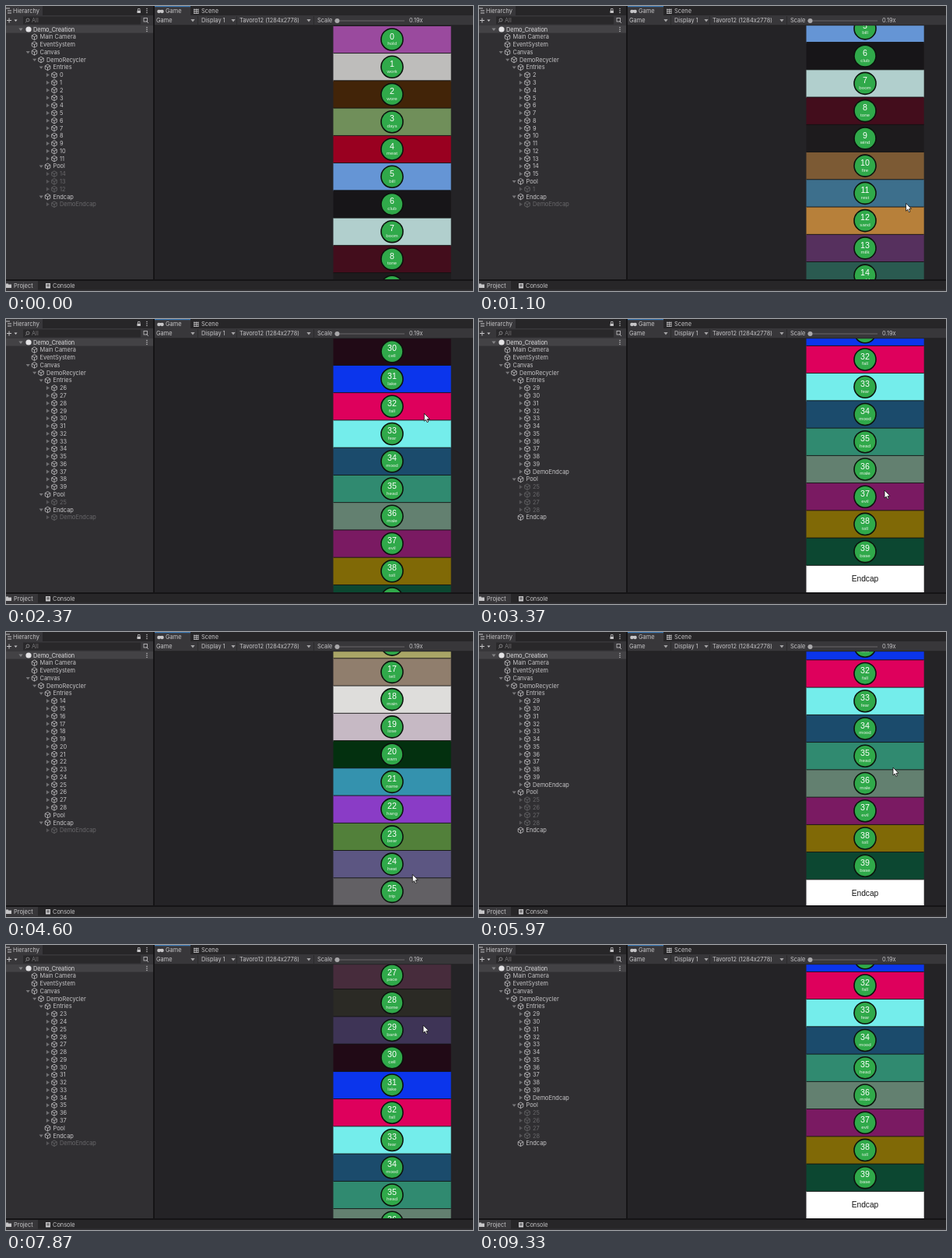
Animation, 600 px wide and 366 px high, one loop 9.36 s. Source, as an HTML page with a canvas:

```html
<!DOCTYPE html>
<html lang="en">
<head>
<meta charset="utf-8">
<title>Recycled list demo</title>
<style>
html, body { margin: 0; width: 600px; height: 366px; overflow: hidden; background: #242326; }
canvas { display: block; }
</style>
</head>
<body>
<canvas id="stage" width="600" height="366"></canvas>
<script>
const ctx = document.getElementById('stage').getContext('2d');
const LOOP = 9360, PITCH = 35.25, TOP = 25.3, VIEW = 326, COUNT = 40, POOL = 15;
const UI = 'Inter, "Open Sans", sans-serif', ENTRY = '"Liberation Sans", Arial, sans-serif';
const LIGHT = '#c6c5c7', DIM = '#68676a';

const words = ('hold work wore days meat bill club boom tone wind fire rest sand milk gold path ' +
  'camp tell main lose earn name hang bear heat trip calm pace home bank ' +
  'cell lake fall fear mood head male evil toll base').split(' ');
const colors = ('9a4a9e bebdbb 422408 708f5a 990020 6595d5 171518 b1cfcd 430d1c 1d1b1d ' +
  '7c5a34 3d6f8c b7803a 56305e 2a5a50 8c3d3d a9a566 907e6d dedddb c6b9c4 ' +
  '03300f 3492ae 8a3cc6 52803a 5c5682 626064 62653a 472c3c 2b2a25 3e3456 ' +
  '210a16 0b35ec de005c 74edeb 1b4b6c 308a70 638070 7a1a62 806906 0c4731').split(' ');

// [time, scroll offset]
const scrollKeys = [
  [0, 0], [550, 0], [850, 90], [1100, 190], [1400, 260], [1600, 454], [1700, 584.5],
  [1850, 752], [2000, 878], [2300, 1036], [2600, 1108], [2800, 1119], [3830, 1119],
  [4100, 960], [4450, 640], [4750, 570], [5050, 680], [5350, 980], [5650, 1117.5],
  [5970, 1117.5], [6200, 1010], [6500, 740], [6700, 665], [6870, 647.3], [7250, 630],
  [7600, 705], [7800, 912], [7870, 955.3], [8050, 1015], [8500, 1080], [8900, 1119], [LOOP, 1119]];
// [time, x, y]
const mouseKeys = [
  [0, 620, 240], [120, 620, 240], [500, 552, 290], [900, 550, 180], [1250, 548, 300],
  [1700, 550, 37], [2100, 545, 70], [2800, 525, 200], [3370, 521, 220], [3800, 525, 120],
  [4450, 524, 300], [4800, 520, 318], [5350, 535, 110], [5970, 532, 174], [6150, 531, 165],
  [6870, 514, 327], [7400, 516, 325], [7870, 536, 103], [8250, 535, 250], [8800, 534, 110],
  [9050, 540, 200], [9300, 556, 380], [LOOP, 556, 380]];

// Monotone cubic interpolation of one column
function sample(keys, t, col = 1) {
  let i = 0;
  while (i < keys.length - 2 && t >= keys[i + 1][0]) i++;
  const slope = k => keys[k] && keys[k + 1]
    ? (keys[k + 1][col] - keys[k][col]) / (keys[k + 1][0] - keys[k][0]) : 0;
  const tangent = k => {
    const a = slope(k - 1), b = slope(k);
    return a * b > 0 ? 2 * a * b / (a + b) : 0;
  };
  const [t0, t1] = [keys[i][0], keys[i + 1][0]], d = t1 - t0, u = (t - t0) / d;
  const a = keys[i][col], b = keys[i + 1][col], ease = u * u * (3 - 2 * u);
  return a + (b - a) * ease
    + d * u * (1 - u) * ((1 - u) * tangent(i) - u * tangent(i + 1));
}

function rect(x, y, w, h, color) {
  ctx.fillStyle = color;
  ctx.fillRect(x, y, w, h);
}

function text(s, x, y, color = LIGHT, size = 7.4, align = 'left', font = UI) {
  ctx.font = `${size}px ${font}`;
  ctx.textAlign = align;
  ctx.textBaseline = 'middle';
  ctx.fillStyle = color;
  ctx.fillText(s, x, y + 0.4);
}

function disc(x, y, r, color) {
  ctx.fillStyle = color;
  ctx.beginPath();
  ctx.arc(x, y, r, 0, 7);
  ctx.fill();
}

function path(points, color, fill) {
  ctx.beginPath();
  points.forEach(([x, y]) => ctx.lineTo(x, y));
  if (fill) { ctx.fillStyle = color; ctx.fill(); }
  else { ctx.strokeStyle = color; ctx.lineWidth = 0.8; ctx.stroke(); }
}

const caret = (x, y, color = '#a5a4a6', r = 2.6) =>
  path([[x - r, y - r * .55], [x + r, y - r * .55], [x, y + r * .75]], color, true);
const caretRight = (x, y, color) =>
  path([[x - 1.6, y - 2.6], [x - 1.6, y + 2.6], [x + 2.4, y]], color, true);

function cube(x, y, color) {
  const corner = k => [x + 3.8 * Math.sin(k * Math.PI / 3), y - 3.8 * Math.cos(k * Math.PI / 3)];
  path([0, 1, 2, 3, 4, 5, 0].map(corner), color);
  path([corner(1), [x, y], corner(5)], color);
  path([[x, y], corner(3)], color);
}

function lock(x, y) {
  rect(x - 2, y, 4.4, 3, LIGHT);
  path([[x - 1, y], [x - 1, y - 2.5], [x + 1.5, y - 2.5], [x + 1.5, y]], LIGHT);
}

const dots = (x, y) => [-2.4, 0, 2.4].forEach(d => disc(x, y + d, 0.75, LIGHT));

function hierarchy(t) {
  // The tree refreshes a few times a second
  const tick = Math.floor(t / 200) * 200;
  const s = sample(scrollKeys, tick), goingUp = s < sample(scrollKeys, Math.max(0, tick - 200));
  const first = Math.max(0, Math.floor(s / PITCH) - 2);
  const bottom = Math.floor((s + VIEW) / PITCH) + 2;
  const last = Math.min(COUNT - 1, bottom), atEnd = bottom >= COUNT;
  const start = goingUp ? Math.min(first, COUNT - POOL) : Math.max(0, last - POOL + 1);

  const active = [], pool = [];
  for (let i = start; i < start + POOL; i++) (i >= first && i <= last ? active : pool).push(i);
  if (!start) pool.reverse();
  if (atEnd) active.push('DemoEndcap');

  const rows = [[1, 'Main Camera'], [1, 'EventSystem'], [1, 'Canvas', 'open'],
    [2, 'DemoRecycler', 'open'], [3, 'Entries', 'open'],
    ...active.map(n => [4, n, 'shut']),
    [3, 'Pool', pool.length && 'open'],
    ...pool.map(n => [4, n, 'shut', true]),
    [3, 'Endcap', !atEnd && 'open']];
  if (!atEnd) rows.push([4, 'DemoEndcap', 'shut', true]);

  rect(0, 0, 189, 351, '#302f32');
  rect(0, 0, 189, 12, '#272628');
  rect(0, 0, 47, 12, '#38373a');
  rect(0, 12, 189, 13, '#38373a');
  [2.5, 5.5, 8.5].forEach((y, i) => rect(i ? 2 : 0, y, 5, 1, LIGHT));
  text('Hierarchy', 9, 6);
  lock(170.5, 6);
  dots(181, 6);
  rect(1, 18, 6, 1, LIGHT);
  rect(3.5, 15.5, 1, 6, LIGHT);
  caret(12.5, 18.5, LIGHT, 2);
  rect(22, 13.5, 151, 10, '#29282a');
  ctx.strokeStyle = '#9a999b';
  ctx.lineWidth = 0.8;
  ctx.beginPath();
  ctx.arc(28, 18, 2, 0, 7);
  ctx.stroke();
  path([[26.5, 19.5], [25, 21.3]], '#9a999b');
  text('All', 33, 18.5, '#777679');
  ctx.strokeStyle = LIGHT;
  ctx.strokeRect(177, 15.5, 4.5, 4.5);
  path([[180.5, 19.5], [183, 22]], LIGHT);

  rect(0, 25, 189, 9.6, '#434245');
  caret(19, 30, '#848386');
  disc(29, 30, 3.6, '#e4e3e5');
  text('Demo_Creation', 35, 30, '#dddcde');
  dots(181, 30);

  rows.forEach(([depth, name, state, faded], i) => {
    const x = 35 + 8.5 * depth, y = 30 + 9.77 * (i + 1);
    if (state === 'open') caret(x - 15.3, y, '#78777a');
    if (state === 'shut') caretRight(x - 15.5, y, faded ? '#565558' : '#707073');
    cube(x - 7, y, faded ? DIM : LIGHT);
    text(String(name), x, y, faded ? DIM : LIGHT);
  });
}

function list(s) {
  rect(191, 25, 409, 326, '#242326');
  ctx.save();
  ctx.beginPath();
  ctx.rect(420.5, 25, 151.2, 326.3);
  ctx.clip();
  for (let i = Math.floor(s / PITCH); i <= COUNT && i * PITCH < s + VIEW; i++) {
    const y = TOP + i * PITCH - s, mid = y + PITCH / 2;
    rect(420, y, 152, PITCH + 1, i < COUNT ? '#' + colors[i] : '#fff');
    rect(420, y - 0.4, 152, 0.9, '#121212');
    if (i === COUNT) {
      text('Endcap', 496, mid, '#161616', 10.2, 'center', ENTRY);
      continue;
    }
    disc(496, mid, 14.8, '#0b120c');
    disc(496, mid, 13.2, '#30a94a');
    text(String(i), 496, mid - 3.6, '#fff', 10.6, 'center', ENTRY);
    text(words[i], 496, mid + 5.4, '#e6f3e8', 6.2, 'center', ENTRY);
  }
  ctx.restore();
}

function gameFrame() {
  rect(189, 0, 2, 351, '#151416');
  rect(191, 0, 409, 12, '#272628');
  rect(191, 0, 46, 12, '#38373a');
  rect(191, 0, 46, 1.2, '#3d79b5');
  rect(191, 12, 409, 13, '#38373a');
  rect(191, 24.4, 409, 0.8, '#1f1e20');
  disc(196.5, 7, 2.3, LIGHT);
  disc(200.5, 7, 2.3, LIGHT);
  rect(196.5, 5, 4, 3, LIGHT);
  text('Game', 205, 6.5);
  for (let k = 0; k < 3; k++) {
    rect(241, 4 + k * 2.5, 6.5, 0.8, LIGHT);
    rect(241.5 + k * 2.5, 3.5, 0.8, 6.5, LIGHT);
  }
  text('Scene', 251, 6.5);

  text('Game', 193, 18.5);
  text('Display 1', 251, 18.5);
  text('Tavoro12 (1284x2778)', 300, 18.5);
  [240, 292, 389].forEach(x => caret(x, 18.5));
  [246, 296, 395].forEach(x => rect(x, 13, 0.8, 11, '#29282a'));
  text('Scale', 400, 18.5);
  rect(422, 18.5, 90, 1, '#6a696b');
  disc(425.5, 19, 3, '#a9a8aa');
  text('0.19x', 518, 18.5);
}

function footer() {
  rect(0, 351, 600, 15, '#272628');
  rect(0, 351, 600, 2, '#151416');
  rect(0, 353, 41, 12, '#38373a');
  rect(0, 364.5, 600, 1.5, '#343336');
  rect(0, 356.5, 3, 1.5, LIGHT);
  rect(0, 357.5, 7, 4.5, LIGHT);
  text('Project', 10, 359);
  rect(51, 356, 6, 6.5, LIGHT);
  [357.5, 359.3].forEach(y => rect(52.2, y, 3.6, 0.8, '#272628'));
  text('Console', 60, 359);
}

function pointer(x, y) {
  const shape = [[0, 0], [0, 10], [2.2, 8], [3.8, 11.5], [5.4, 10.8], [3.9, 7.4], [7, 7.2], [0, 0]]
    .map(([dx, dy]) => [x + dx, y + dy]);
  path(shape, '#fff', true);
  path(shape, '#111');
}

function draw(now) {
  const t = now % LOOP;
  list(sample(scrollKeys, t));
  gameFrame();
  hierarchy(t);
  footer();
  pointer(sample(mouseKeys, t, 1), sample(mouseKeys, t, 2));
}

const begin = performance.now();
function frame() {
  draw(performance.now() - begin);
  requestAnimationFrame(frame);
}
frame();
</script>
</body>
</html>
```
